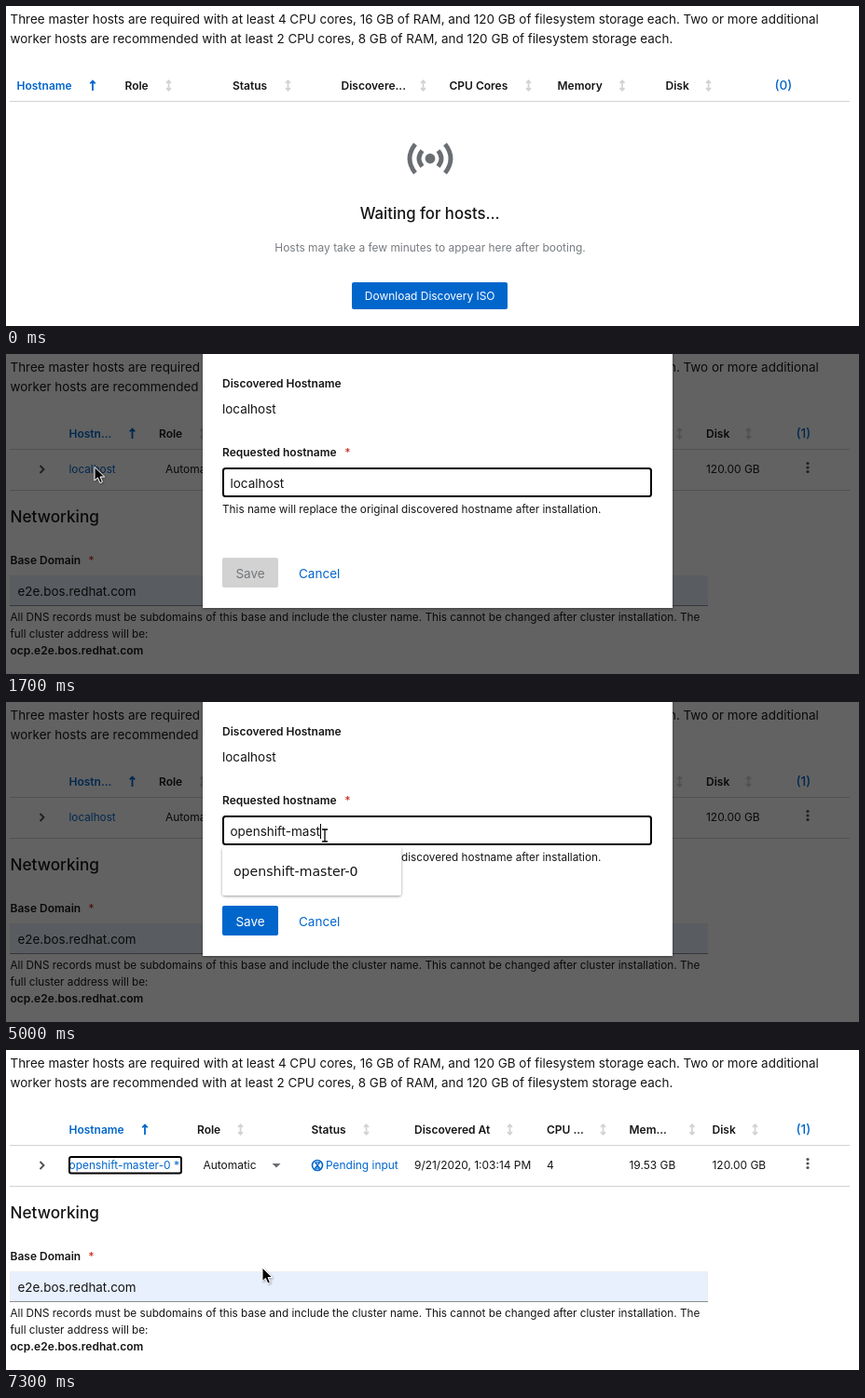
An HTML page that plays this animation: 915 by 344 pixels, repeating every 8000 ms.

```html
<!DOCTYPE html>
<html lang="en">
<head>
<meta charset="utf-8">
<title>Host discovery</title>
<style>
  html, body { margin: 0; width: 100%; height: 100%; overflow: hidden; background: #fff; }
  svg { display: block; width: 915px; height: 344px; }
  text { font-family: Inter, "Open Sans", sans-serif; fill: #151515; white-space: pre; }
  .body { font-size: 13.45px; }
  .field { font-size: 13.5px; }
  .small { font-size: 11.75px; }
  .cell { font-size: 11.95px; }
  .bold { font-size: 12px; font-weight: 600; }
  .count { font-size: 13.6px; font-weight: 500; }
  .title { font-size: 16.7px; font-weight: 500; }
  .section { font-size: 17.2px; font-weight: 500; }
  .option { font: 14.1px "DejaVu Sans", sans-serif; }
  .blue { fill: #06c; }
  .grey { fill: #787c80; }
  .white { fill: #fff; }
  .red { fill: #c9190b; }
  .mid { text-anchor: middle; }
  .line { fill: none; stroke: #d2d2d2; }
  .ring { fill: none; stroke: #000; stroke-width: 2; }
</style>
</head>
<body>
<svg id="stage" viewBox="0 0 915 344">
  <defs>
    <filter id="shadow" x="-10%" y="-20%" width="120%" height="150%">
      <feDropShadow dx="0" dy="1" stdDeviation="1.5" flood-opacity=".4"/>
    </filter>
    <filter id="soft" x="-30%" y="-30%" width="180%" height="180%">
      <feDropShadow dx="1" dy="1" stdDeviation=".8" flood-opacity=".35"/>
    </filter>
    <g id="signal" fill="none" stroke="currentColor" stroke-width="4.8">
      <circle r="5.4" fill="currentColor" stroke="none"/>
      <path id="waves" d="M-16-15.5Q-28 0-16 15.5M-8.5-8.5Q-15.5 0-8.5 8.5"/>
      <use href="#waves" transform="scale(-1 1)"/>
    </g>
    <g id="hourglass" fill="none" stroke="#06c" stroke-width="1.6">
      <circle r="5.5"/>
      <path d="M-2.6-3.2H2.6L-2.4 3.2H2.6L-2.4-3.2" stroke-width="1.3"/>
    </g>
    <path id="both" d="M0-5V5M-2.5-2.6L0-5.2L2.5-2.6M-2.5 2.6L0 5.2L2.5 2.6" fill="none" stroke="#d2d2d2" stroke-width="1.7"/>
    <path id="up" d="M0 5.5V-5M-2.7-2.2L0-5L2.7-2.2" fill="none" stroke="#06c" stroke-width="1.8"/>
    <path id="arrow" d="M0 0V14.5L3.4 11.4L5.9 17L8.4 15.9L6 10.5H10.7Z" fill="#000" stroke="#fff" filter="url(#soft)"/>
    <path id="hand" d="M-1.2 1Q0-.6 1.2 1V5.5Q3-.0 4 6Q5.8 5 6.4 6.7Q8.4 6 8.6 8.5V11L7 15H-.5L-4 9.5Q-3.8 7.4-1.2 9.6Z" fill="#fff" stroke="#000" stroke-width="1.4"/>
    <g id="ibeam" fill="none">
      <path d="M-3-6.5H3M0-6V6M-3 6.5H3" stroke="#fff" stroke-width="3"/>
      <path d="M-3-6.5H3M0-6V6M-3 6.5H3" stroke="#000" stroke-width="1.3"/>
    </g>
  </defs>
</svg>
<script>
const LOOP = 8000;
const stage = document.getElementById('stage');

const text = (x, y, cls, s, id = '') => `<text id="${id}" x="${x}" y="${y}" class="${cls}">${s}</text>`;
const use = (id, x, y, more = '') => `<use href="#${id}" transform="translate(${x} ${y}) ${more}"/>`;
const rect = (x, y, w, h, fill, r = 0, more = '') =>
  `<rect x="${x}" y="${y}" width="${w}" height="${h}" rx="${r}" fill="${fill}" ${more}/>`;
const rule = y => `<path class="line" d="M4 ${y}.5H905"/>`;
const linkRing = w => `<rect class="ring" x="68" y="115" width="${w}" height="17.5" rx="2"/>`;
const inputEdge = (x, y, w, h) =>
  `<path d="M${x + .5} ${y + h}V${y + .5}H${x + w - .5}V${y + h}" fill="none" stroke="#ededed"/>` +
  `<path d="M${x} ${y + h - .5}h${w}" stroke="#8a8d90"/>`;

function layer(id, html) {
  stage.insertAdjacentHTML('beforeend', `<g id="${id}">${html}</g>`);
  return document.getElementById(id);
}
const show = (el, on) => { el.style.display = on ? '' : 'none'; };

// Each column: label, text x, sort icon x.
function header(cols, count, countX) {
  return cols.map(([label, x, icon], i) =>
    text(x, 90, i ? 'bold' : 'bold blue', label) + use(i ? 'both' : 'up', icon, 85.5)
  ).join('') + text(countX, 90, 'count blue', count) + rule(102);
}

function row(role, status, label, icon, cells) {
  const dots = [117.5, 122, 126.5].map(y => `<circle cx="860" cy="${y}" r="1.6" fill="#4f5255"/>`).join('');
  return `<path d="M36.5 120L40.5 124L36.5 128" fill="none" stroke="#4f5255" stroke-width="1.9"/>` +
    text(role, 128, 'cell', 'Automatic') +
    `<path d="M${role + 74} 122h9l-4.5 4.6z" fill="#6a6e73"/>` +
    icon + text(status, 128, 'cell blue', label) +
    cells.map(([s, x]) => text(x, 128, 'cell', s)).join('') + dots + rule(146);
}

layer('intro',
  text(4.5, 19, 'body', 'Three master hosts are required with at least 4 CPU cores, 16 GB of RAM, and 120 GB of filesystem storage each. Two or more additional') +
  text(4.5, 40, 'body', 'worker hosts are recommended with at least 2 CPU cores, 8 GB of RAM, and 120 GB of filesystem storage each.'));

const waiting = layer('waiting',
  header([['Hostname', 11.5, 93], ['Role', 127.5, 174.5], ['Status', 243, 302.5], ['Discovere...', 359.5, 447.5],
    ['CPU Cores', 475.5, 560.5], ['Memory', 591.5, 661], ['Disk', 707.5, 753.5]], '(0)', 824.5) +
  `<g color="#6a6e73">${use('signal', 455, 164)}</g>` +
  text(454.7, 229, 'title mid', 'Waiting for hosts...') +
  text(455, 264, 'cell grey mid', 'Hosts may take a few minutes to appear here after booting.') +
  rect(371, 297, 167, 29, '#06c', 2) +
  text(454.7, 316, 'cell white mid', 'Download Discovery ISO'));

const found = layer('found',
  header([['Hostn...', 67.5, 135.5], ['Role', 164, 210.5], ['Status', 297.5, 356.5], ['Discovered At', 404, 506.5],
    ['CPU ...', 558, 619.5], ['Memo...', 653.5, 722.5], ['Disk', 751, 796.5]], '(1)', 847.5) +
  row(171, 313, 'Discovering', `<g color="#06c">${use('signal', 304, 124, 'scale(.26)')}</g>`,
    [['9/21/2020, 1:03:14 PM', 404], ['4', 558], ['19.53 GB', 653.5], ['120.00 GB', 751]]) +
  text(67.5, 128, 'small blue', 'localhost'));

const underline = layer('underline', '<path d="M68 130.5H118" stroke="#004080"/>');
const focus = layer('focus', linkRing(50));

const renamed = layer('renamed',
  header([['Hostname', 67.5, 149], ['Role', 205, 251.5], ['Status', 327.5, 386.5], ['Discovered At', 438, 540.5],
    ['CPU ...', 580, 640.5], ['Mem...', 668.5, 736], ['Disk', 757.5, 803.5]], '(1)', 847.5) +
  row(211.5, 343, 'Pending input', use('hourglass', 334, 124),
    [['9/21/2020, 1:03:14 PM', 438], ['4', 580], ['19.53 GB', 668.5], ['120.00 GB', 757.5]]) +
  text(67.5, 128, 'cell blue', 'openshift-master-0 *') + linkRing(120));

const network = layer('network',
  text(4.5, 181, 'section', 'Networking') +
  text(4.5, 226, 'bold', 'Base Domain') + text(88.5, 226, 'small red', '*') +
  rect(4, 238, 749, 33, '#e8f0fe') + inputEdge(4, 238, 749, 33) +
  text(12.5, 260, 'body', 'e2e.bos.redhat.com') +
  text(4.5, 287, 'small', 'All DNS records must be subdomains of this base and include the cluster name. This cannot be changed after cluster installation. The') +
  text(4.5, 305, 'small', 'full cluster address will be:') +
  text(4.5, 323, 'bold', 'ocp.e2e.bos.redhat.com'));

const modal = layer('modal',
  rect(0, 0, 915, 344, '#030303', 0, 'opacity=".62"') +
  rect(211, -20, 504, 293, '#fff', 0, 'filter="url(#shadow)"') +
  text(232, 36, 'bold', 'Discovered Hostname') +
  text(232, 64, 'field', 'localhost') +
  text(232, 110, 'bold', 'Requested hostname') + text(363.5, 110, 'small red', '*') +
  `<g id="blurred">${inputEdge(232, 122, 461, 32)}</g>` +
  '<rect id="active" class="ring" x="233" y="123" width="459" height="30" rx="2.5"/>' +
  rect(240, 130, 58, 18.5, '#3390ff', 0, 'id="mark"') +
  text(240.5, 144, 'field', '', 'value') +
  '<path id="caret" d="M0 131V147" stroke="#000"/>' +
  text(232, 171, 'small', 'This name will replace the original discovered hostname after installation.') +
  rect(232, 219, 60, 32, '#d2d2d2', 2, 'id="save"') +
  text(262, 241, 'field mid', 'Save', 'saveText') +
  text(314, 241, 'field blue', 'Cancel') +
  `<g id="list">${rect(232, 156, 192, 52, '#fff', 3, 'id="listBox" filter="url(#shadow)"')}` +
  text(244, 187, 'option', 'openshift-master-0') +
  text(244, 225, 'option', 'open-node-0', 'second') + '</g>');

const cursor = layer('cursor', '<use id="shape"/>');
const [blurred, active, mark, value, caret, save, saveText, list, listBox, second, shape] =
  ['blurred', 'active', 'mark', 'value', 'caret', 'save', 'saveText', 'list', 'listBox', 'second', 'shape']
    .map(id => document.getElementById(id));

// Time and number of letters typed by then.
const NAME = 'openshift-master-0';
const typed = [[3300, 1], [3400, 2], [3500, 3], [3600, 4], [3800, 5], [3900, 6], [4000, 8], [4200, 9], [4500, 10],
  [4700, 11], [4800, 13], [5000, 14], [5100, 15], [5200, 16], [5400, 17], [5700, 18]];

// Pointer: time, shape, x, y.
const path = [[900, 'arrow', 124, 32], [1000, 'arrow', 110, 62], [1100, 'arrow', 82, 92], [1200, 'arrow', 52, 108],
  [1300, 'hand', 76, 118], [1400, 'hand', 95, 121.5], [1700, 'arrow', 95, 121.5], [1800, 'arrow', 110, 124],
  [1900, 'arrow', 160, 130], [2000, 'arrow', 220, 135], [2100, 'ibeam', 275, 139], [2200, 'ibeam', 322, 142],
  [2300, 'ibeam', 342, 143.5], [6300, 'ibeam', 287, 100], [6400, 'arrow', 276, 118], [6500, 'ibeam', 270, 143],
  [6600, 'arrow', 270, 178], [6700, 'arrow', 272, 208], [6800, 'hand', 274, 226], [6900, 'hand', 275, 234],
  [7300, 'arrow', 275, 234]];

const last = (steps, t) => steps.filter(s => s[0] <= t).pop();

function draw(t) {
  const between = (a, b) => t >= a && t < b;
  const letters = (last(typed, t) || [0, 0])[1];
  const word = letters ? NAME.slice(0, letters) : 'localhost';
  const point = last(path, t);

  show(waiting, t < 500);
  show(found, between(500, 7300));
  show(network, t >= 500);
  show(renamed, t >= 7300);
  show(underline, between(1300, 1700));
  show(focus, between(1600, 1700));
  show(modal, between(1700, 7300));

  show(active, t < 7000);
  show(blurred, t >= 7000);
  const marked = between(2500, 3300);
  show(mark, marked);
  value.textContent = word;
  value.style.fill = marked ? '#fff' : '#151515';

  const typing = between(3300, 5900);
  show(caret, typing);
  if (typing) {
    const end = Math.round(240.5 + value.getComputedTextLength());
    caret.setAttribute('transform', `translate(${end + .5} 0)`);
  }

  // A name may not end with a hyphen.
  const valid = letters > 0 && !word.endsWith('-') && t < 7100;
  save.style.fill = valid ? '#06c' : '#d2d2d2';
  saveText.style.fill = valid ? '#fff' : '#72767b';

  const two = between(3300, 3800);
  show(list, typing);
  show(second, two);
  listBox.setAttribute('height', two ? 90 : 52);

  show(cursor, !!point);
  if (point) {
    const [, kind, x, y] = point;
    shape.setAttribute('href', '#' + kind);
    cursor.setAttribute('transform', `translate(${x} ${y})`);
  }
}

const start = performance.now();
function tick() {
  draw((performance.now() - start) % LOOP);
  requestAnimationFrame(tick);
}
tick();
</script>
</body>
</html>
```
